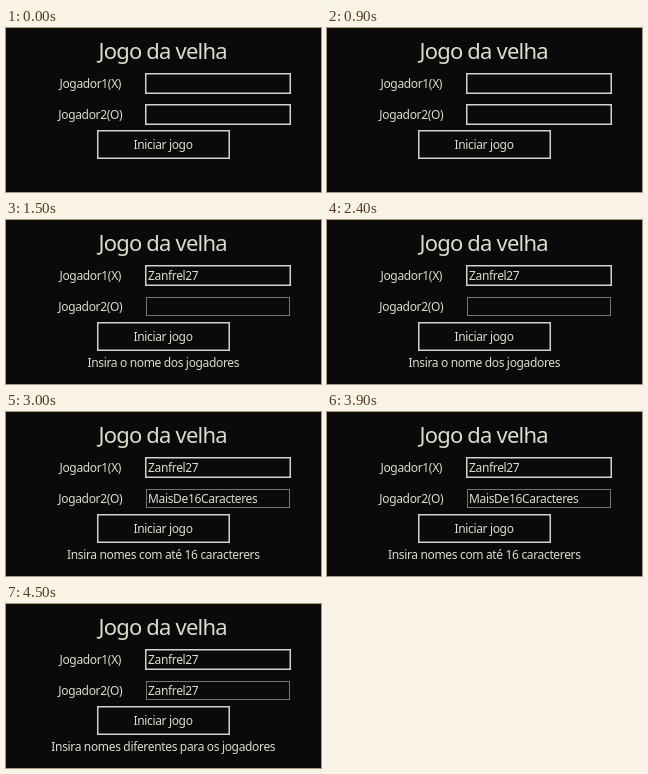
Animation, 315 px wide and 164 px high, one loop 6 s. Source, as an HTML page:

```html
<!DOCTYPE html>
<html lang="pt-BR">
<head>
<meta charset="utf-8">
<title>Jogo da velha</title>
<style>
  html, body { margin: 0; width: 100%; height: 100%; overflow: hidden; background: #0a0a0a; }
  svg { display: block; width: 315px; height: 164px; }
  text { font: 12px "Noto Sans", "Open Sans", sans-serif; letter-spacing: -.34px; fill: #dcdccc; }
  .mid { text-anchor: middle; }
  .title { font-size: 22px; letter-spacing: -.8px; }
  .box { fill: none; stroke: #d2d2d2; stroke-width: 1.5; }
  .box.thin { stroke: #747474; stroke-width: 1; }
</style>
</head>
<body>
<svg viewBox="0 0 315 164">
  <text class="mid title" x="156.6" y="31">Jogo da velha</text>
  <text class="mid" x="84.3" y="60">Jogador1(X)</text>
  <text class="mid" x="84.3" y="91">Jogador2(O)</text>
  <rect class="box" x="139.75" y="45.75" width="144.5" height="19.5"/>
  <rect class="box" id="field2" x="139.75" y="76.75" width="144.5" height="19.5"/>
  <text id="name1" x="142" y="60"></text>
  <text id="name2" x="142" y="91"></text>
  <rect class="box" x="91.75" y="102.75" width="131.5" height="27.5"/>
  <text class="mid" x="157" y="121">Iniciar jogo</text>
  <text class="mid" id="message" x="157.3" y="147"></text>
</svg>
<script>
  const STEP = 1500;
  const player = "Zanfrel27";
  // first name, second name, message
  const states = [
    ["", "", ""],
    [player, "", "Insira o nome dos jogadores"],
    [player, "MaisDe16Caracteres", "Insira nomes com até 16 caracterers"],
    [player, player, "Insira nomes diferentes para os jogadores"]
  ];
  const $ = id => document.getElementById(id);
  const field = $("field2");
  let shown = -1;

  function show(i) {
    ["name1", "name2", "message"].forEach((id, k) => $(id).textContent = states[i][k]);
    const thin = i > 0;
    field.classList.toggle("thin", thin);
    field.setAttribute("x", thin ? 140.5 : 139.75);
    field.setAttribute("y", thin ? 77.5 : 76.75);
    field.setAttribute("width", thin ? 143 : 144.5);
    field.setAttribute("height", thin ? 18 : 19.5);
    shown = i;
  }

  const start = performance.now();
  function tick() {
    const i = Math.floor((performance.now() - start) / STEP) % states.length;
    if (i !== shown) show(i);
    requestAnimationFrame(tick);
  }
  tick();
</script>
</body>
</html>
```
